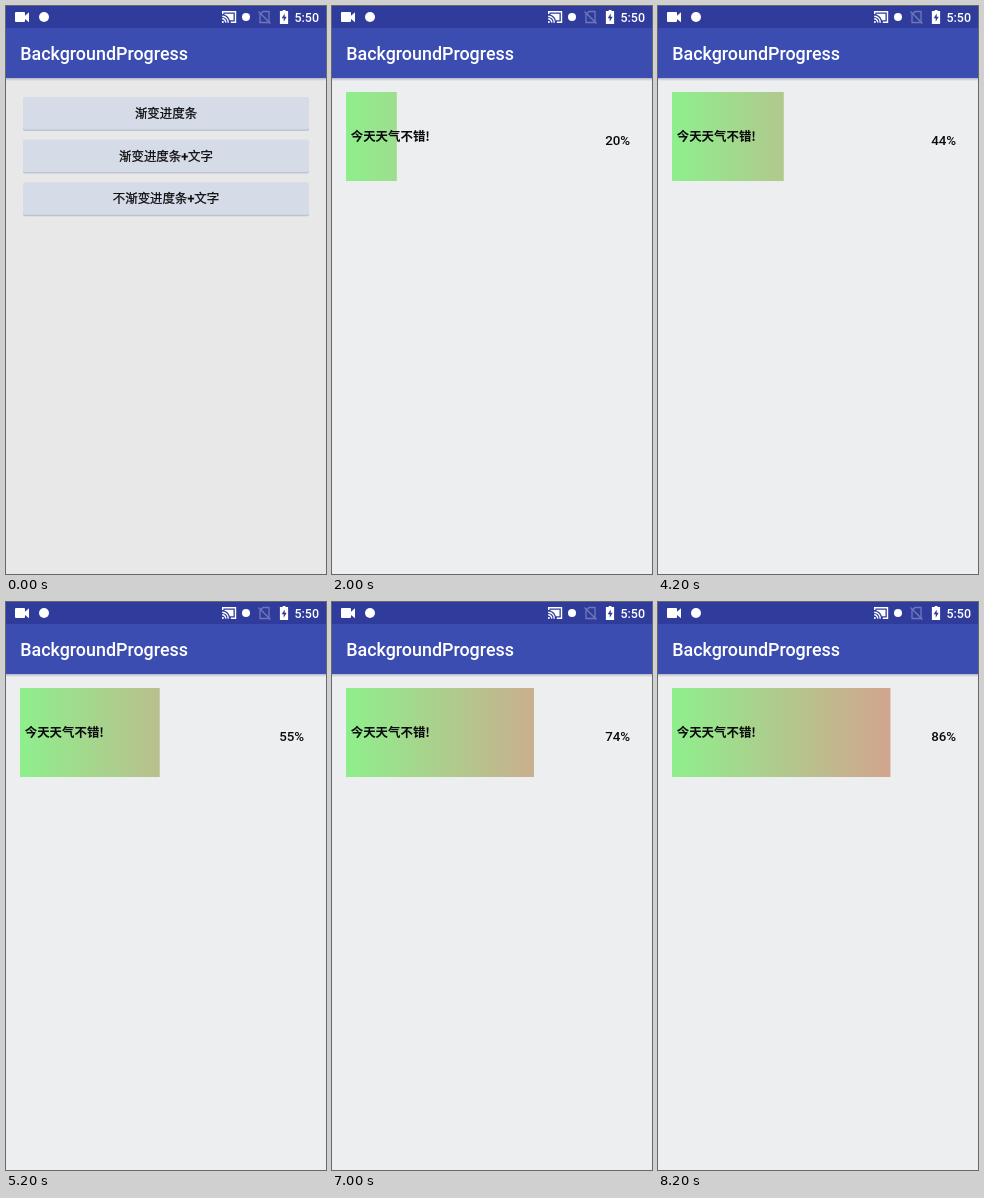
Recreate the animation shown at these times as an HTML page. Size 320 px wide and 568 px high, loop 8.4 s.

```html
<!DOCTYPE html>
<html lang="zh-CN">
<head>
<meta charset="utf-8">
<title>BackgroundProgress</title>
<style>
html, body { margin: 0; width: 100%; height: 100%; overflow: hidden; background: #eceeef; }
svg { display: block; width: 100vw; height: 100vh; }
text { font: 500 12.44px Roboto, "Noto Sans CJK SC", "Noto Sans CJK", sans-serif; fill: #0b0b0d; }
.light { fill: #fff; }
#buttons text { stroke: #0b0b0d; stroke-width: .25; }
</style>
</head>
<body>
<svg viewBox="0 0 320 568">
  <defs>
    <linearGradient id="fade" gradientUnits="userSpaceOnUse" x1="14" x2="268" y1="0" y2="0">
      <stop stop-color="#8eef8c"/>
      <stop offset="1" stop-color="#de988e"/>
    </linearGradient>
    <linearGradient id="shade" x2="0" y2="1">
      <stop stop-color="#b4b8c6"/>
      <stop offset="1" stop-color="#b4b8c6" stop-opacity="0"/>
    </linearGradient>
  </defs>

  <g id="menu">
    <rect width="320" height="568" fill="#e8e8e8"/>
    <g id="buttons"></g>
  </g>

  <g id="progress">
    <rect width="320" height="568" fill="#eceeef"/>
    <rect id="bar" x="14" y="86" height="89" fill="url(#fade)"/>
    <text x="18.700" y="135" style="font-weight:700;font-family:'Noto Sans CJK SC','Noto Sans CJK',sans-serif">今天天气不错!</text>
    <text id="percent" x="273.200" y="138.500" style="font-size:13.33px"></text>
  </g>

  <rect y="72" width="320" height="3" fill="url(#shade)"/>
  <rect width="320" height="72" fill="#3c4db2"/>
  <rect width="320" height="22" fill="#303c9b"/>
  <text class="light" x="14.200" y="54" style="font-size:17.9px">BackgroundProgress</text>
  <text class="light" x="288.500" y="16">5:50</text>

  <g fill="#fff">
    <path d="M10 6h8q1 0 1 1v2.700l4-3.400v10l-4-3.400v2.100q0 1-1 1h-8q-1 0-1-1V7q0-1 1-1z"/>
    <circle cx="38" cy="11" r="5"/>
    <circle cx="240" cy="11" r="4"/>
    <path d="M276.700 5V4h2.800v1h2.600v13h-8.200V5z"/>
  </g>
  <path d="M278.700 7.500l-3 4.700h2v3.500l3-5h-2z" fill="#303c9b"/>
  <g fill="none" stroke="#fff" stroke-width="1.400">
    <path d="M216.700 8V5.700h12.800v10.600h-4.700M216.200 10.200a6 6 0 0 1 6 6.500M216.200 12.800a3.500 3.500 0 0 1 3.500 3.900"/>
  </g>
  <path d="M218.500 7.700h9v6.600h-3.600a8 8 0 0 0-5.400-5.600z" fill="#fff"/>
  <circle cx="216.900" cy="16" r="1" fill="#fff"/>
  <g opacity=".3" fill="none" stroke="#fff" stroke-width="1.300">
    <path d="M257 5.500h6v11h-9V8.500z"/>
    <path d="M252.500 5.500l12 12"/>
  </g>
</svg>
<script>
const LOOP = 8400, STEP = 200, FULL_WIDTH = 254;
const $ = id => document.getElementById(id);

// [time in ms, percent]
const keys = [[200, 0], [1000, 9], [3200, 33], [5200, 55], [6200, 65], [7600, 80], [8200, 86]];

$('buttons').innerHTML = ['渐变进度条', '渐变进度条+文字', '不渐变进度条+文字'].map((label, i) => {
  const y = 91 + i * 42.6;
  return `<rect x="17" y="${y + 1}" width="286" height="33" rx="2" fill="#bfc4d1"/>
    <rect x="17" y="${y}" width="286" height="32.5" rx="2" fill="#d6dbe8"/>
    <text x="160" y="${y + 21.2}" text-anchor="middle">${label}</text>`;
}).join('');

function percentAt(t) {
  const i = Math.max(1, keys.findIndex(k => t <= k[0]));
  const [t0, p0] = keys[i - 1], [t1, p1] = keys[i];
  return Math.round(p0 + (p1 - p0) * (t - t0) / (t1 - t0));
}

function draw(now) {
  const t = Math.floor(now % LOOP / STEP) * STEP;
  const running = t >= keys[0][0];
  $('menu').style.display = running ? 'none' : '';
  $('progress').style.display = running ? '' : 'none';
  if (running) {
    const p = percentAt(t);
    $('bar').setAttribute('width', FULL_WIDTH * p / 100);
    $('percent').textContent = p + '%';
  }
}

const start = performance.now();
function tick() {
  draw(performance.now() - start);
  requestAnimationFrame(tick);
}
tick();
</script>
</body>
</html>
```
